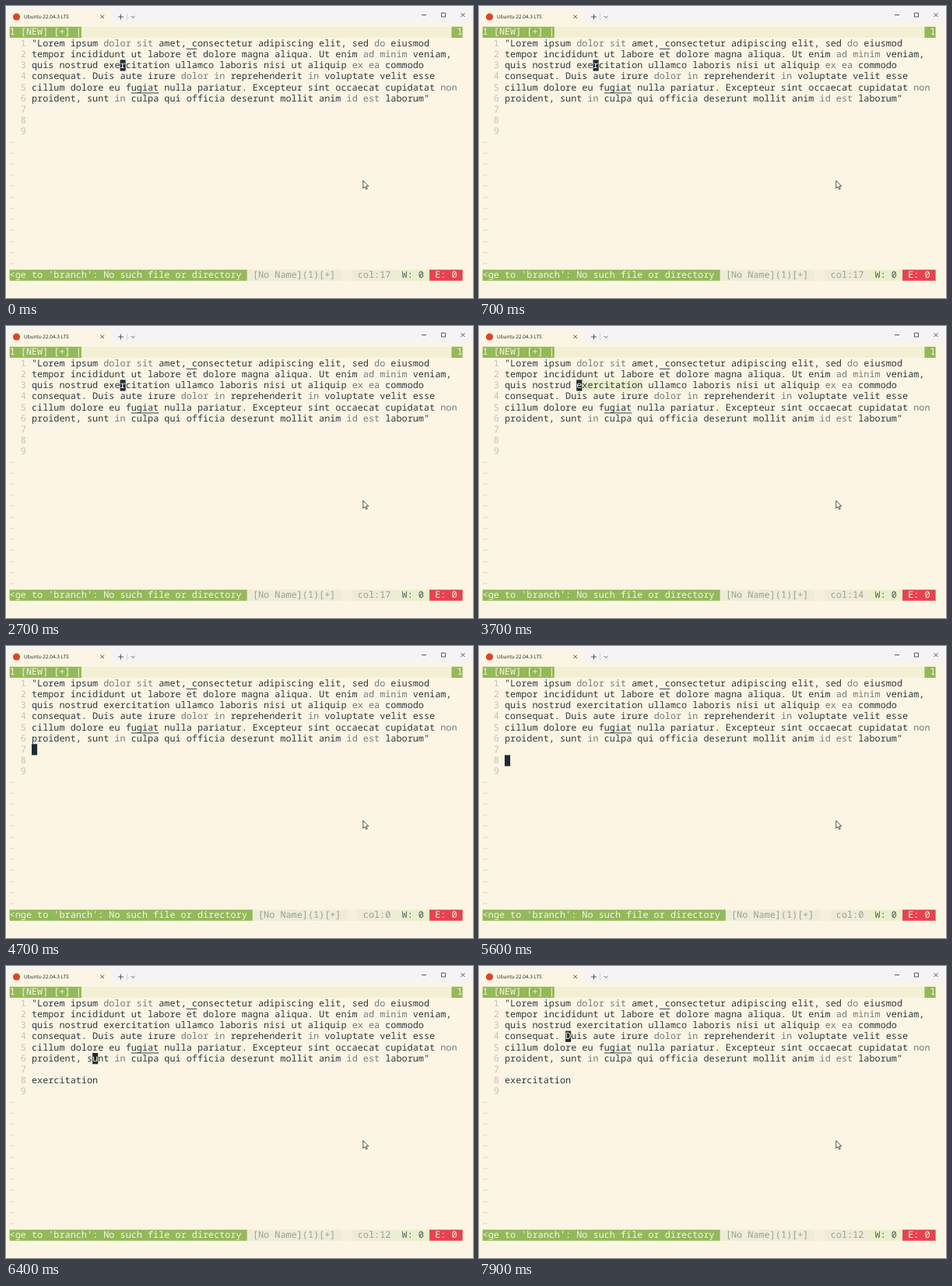
An HTML page for the animation above (8000 ms loop, 600 by 376 pixels).

```html
<!DOCTYPE html>
<html lang="en">
<head>
<meta charset="utf-8">
<title>Terminal editor</title>
<style>
  html, body { margin: 0; width: 100%; height: 100%; overflow: hidden; background: #fdf5e3; }
  svg { display: block; width: 600px; height: 376px; }
  text { white-space: pre; text-rendering: geometricPrecision; font: 11.83px "Noto Sans Mono", monospace; }
  .title { font: 500 6.4px "Open Sans", sans-serif; }
</style>
</head>
<body>
<svg viewBox="0 0 600 376">
  <rect width="600" height="23" fill="#f5f3f3"/>
  <path d="M1 23Q4 23 4 20V8Q4 4.500 7.500 4.500H131.500Q135 4.500 135 8V20Q135 23 138 23Z" fill="#fdf5e3"/>
  <circle cx="13.500" cy="14" r="4.600" fill="#d9472b"/>
  <text class="title" x="23" y="16.400" fill="#1c1c1c">Ubuntu 22.04.3 LTS</text>
  <g fill="none" stroke="#333" stroke-width=".8">
    <path d="M121.500 11.500l4.500 4.500m0-4.500l-4.500 4.500M144 14h7m-3.500-3.500v7M161 13l2.200 2.200 2.200-2.200"/>
    <path d="M534 11.500h6M559.500 9h5v5h-5zM584.500 9l5 5m0-5l-5 5"/>
    <path d="M155.500 9.500v9" stroke="#ccc"/>
  </g>
  <g id="back"></g>
  <g id="page"></g>
  <path d="M231.500 55.200h14M160.800 112h35.500" stroke="#2b3a42"/>
  <g id="caret"></g>
  <g id="status"></g>
  <path d="M458.800 224.800v10l2.300-2.100 1.500 3.400 1.600-.7-1.500-3.300h3.100z" fill="#fff" stroke="#222" stroke-width=".8"/>
</svg>
<script>
const CW = 7.098, RH = 14.22, LEFT = 4.6, TOP = 26.7, GUTTER = 4;
const INK = '#2b3a42', DIM = '#6f7d80', PAPER = '#fdf5e3', GREEN = '#92b95a', PALE = '#f1f0d3';
const BAR = '#efebd8', GREY = '#97a094', MINT = '#e9f0cb', RED = '#e8434d';
const STATUS_ROW = 22, WORD = 'exercitation';

// Words between ~ marks are dimmed.
const prose = [
  '"Lorem ipsum ~dolor sit~ amet, consectetur adipiscing elit, sed ~do~ eiusmod',
  'tempor incididunt ut labore et dolore magna aliqua. Ut enim ~ad minim~ veniam,',
  'quis nostrud exercitation ullamco laboris nisi ut aliquip ~ex ea~ commodo',
  'consequat. Duis aute irure ~dolor in~ reprehenderit ~in~ voluptate velit esse',
  'cillum dolore eu fugiat nulla pariatur. Excepteur sint occaecat cupidatat ~non~',
  'proident, sunt ~in~ culpa qui officia deserunt mollit anim ~id est~ laborum"',
  '', '', ''
];
const plain = prose.map(line => line.replaceAll('~', ''));

// Start time, line and column of the caret
const moves = [
  [0, 3, 16], [3600, 3, 13], [4200, 4, 13], [4350, 5, 13], [4500, 6, 13],
  [4600, 7, 0], [5200, 8, 0], [5900, 8, 11], [6200, 7, 0], [6400, 6, 11],
  [6900, 5, 11], [7400, 4, 11]
];
const PASTE = 5900, YANK = 3600, YANK_END = 4000;

const $ = id => document.getElementById(id);
const box = (row, col, n, fill) =>
  `<rect x="${LEFT + col * CW}" y="${TOP + row * RH}" width="${n * CW}" height="${RH}" fill="${fill}"/>`;
const put = (row, col, text, fill) =>
  `<text x="${LEFT + col * CW}" y="${TOP + row * RH + 10.7}" fill="${fill}">${text.replaceAll('<', '&lt;')}</text>`;
const cell = (row, col, text, fill, back) => box(row, col, text.length, back) + put(row, col, text, fill);

function drawPage() {
  let out = box(0, 0, 82, PALE) + cell(0, 0, '1 [NEW] [+] |', PAPER, GREEN) + cell(0, 80, ' 1', PAPER, GREEN);
  prose.forEach((line, i) => {
    out += put(i + 1, 2, String(i + 1), '#c6c3b5');
    let col = GUTTER;
    line.split('~').forEach((part, k) => {
      if (part) out += put(i + 1, col, part, k % 2 ? DIM : INK);
      col += part.length;
    });
  });
  for (let row = 10; row < STATUS_ROW; row++) out += put(row, 0, '~', '#d6d1c0');
  $('page').innerHTML = out;
}

function statusBar(col) {
  const message = (col ? '<ge' : '<nge') + " to 'branch': No such file or directory ";
  const place = ` col:${col} `, n = message.length, start = 70 - place.length;
  return box(STATUS_ROW, 0, 82, '#f5f0dc')
    + cell(STATUS_ROW, 0, message, PAPER, GREEN)
    + cell(STATUS_ROW, n, ' [No Name](1)[+] ', GREY, BAR)
    + cell(STATUS_ROW, start, place, GREY, BAR)
    + cell(STATUS_ROW, 70, ' W: 0 ', '#4f5d63', MINT)
    + cell(STATUS_ROW, 76, ' E: 0 ', PAPER, RED);
}

let shown = '';
function frame(now) {
  const t = now % 8000;
  const [, row, col] = moves.findLast(move => move[0] <= t);
  const pasted = t >= PASTE, yanked = t >= YANK && t < YANK_END;
  const key = [row, col, pasted, yanked].join();
  if (key !== shown) {
    shown = key;
    const line = row === 8 && pasted ? WORD : plain[row - 1];
    $('back').innerHTML = yanked ? box(3, GUTTER + 13, WORD.length, MINT) : '';
    $('caret').innerHTML = (pasted ? put(8, GUTTER, WORD, INK) : '')
      + cell(row, GUTTER + col, line[col] || ' ', PAPER, '#1d2b33');
    $('status').innerHTML = statusBar(line ? col + 1 : 0);
  }
  requestAnimationFrame(frame);
}

drawPage();
frame(performance.now());
</script>
</body>
</html>
```
